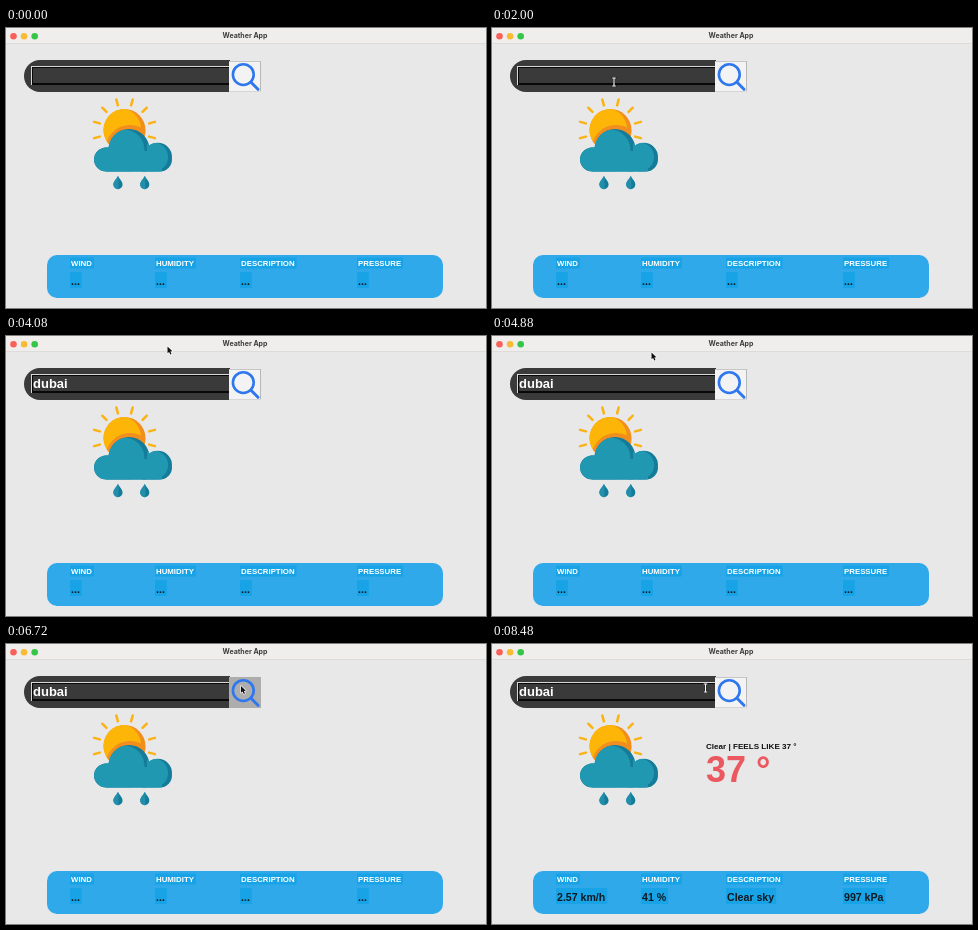
Animation, 480 px wide and 280 px high, one loop 8560 ms. Source, as an HTML page with a canvas:

```html
<!DOCTYPE html>
<html lang="en">
<head>
<meta charset="utf-8">
<title>Weather App</title>
<style>
html, body { margin: 0; width: 100%; height: 100%; overflow: hidden; background: #e8e8e8; }
canvas { display: block; width: 480px; height: 280px; }
</style>
</head>
<body>
<canvas id="stage"></canvas>
<script>
const LOOP = 8560, STEP = 80;
const TYPING_START = 2400, KEY_INTERVAL = 160;
const PRESS = 6640, RELEASE = 6880, RESULT = 7360;
const SANS = '"Liberation Sans", Arial, sans-serif';

const canvas = document.getElementById('stage');
const ctx = canvas.getContext('2d');
const ratio = window.devicePixelRatio || 1;
canvas.width = 480 * ratio;
canvas.height = 280 * ratio;

// Pointer stops: time, x, y
const path = [
  [480, 176, 104], [1280, 122, 54], [2080, 122, 54], [2640, 119, -7],
  [3280, 119, -7], [3760, 150, 5], [4080, 161.5, 10.5], [4480, 159.5, 16.5],
  [5920, 159.5, 16.5], [6480, 235, 42], [7520, 235, 42], [8240, 213.5, 44]
];

const columns = [
  { x: 65, label: 'WIND', value: '2.57 km/h' },
  { x: 150, label: 'HUMIDITY', value: '41 %' },
  { x: 235, label: 'DESCRIPTION', value: 'Clear sky' },
  { x: 352, label: 'PRESSURE', value: '997 kPa' }
];

function rect(x, y, w, h, color) {
  ctx.fillStyle = color;
  ctx.fillRect(x, y, w, h);
}

function circle(x, y, r, color) {
  ctx.beginPath();
  ctx.arc(x, y, r, 0, Math.PI * 2);
  ctx.fillStyle = color;
  ctx.fill();
}

function rounded(x, y, w, h, r, color) {
  ctx.beginPath();
  ctx.roundRect(x, y, w, h, r);
  ctx.fillStyle = color;
  ctx.fill();
}

function line(x1, y1, x2, y2, width, color, cap = 'round') {
  ctx.beginPath();
  ctx.moveTo(x1, y1);
  ctx.lineTo(x2, y2);
  ctx.lineWidth = width;
  ctx.lineCap = cap;
  ctx.strokeStyle = color;
  ctx.stroke();
}

function text(str, x, y, size, color, family = SANS, align = 'left') {
  ctx.font = `bold ${size}px ${family}`;
  ctx.textAlign = align;
  ctx.fillStyle = color;
  ctx.fillText(str, x, y);
}

function clipped(trace, draw) {
  ctx.save();
  ctx.beginPath();
  trace();
  ctx.clip();
  draw();
  ctx.restore();
}

function drawWindow() {
  rect(0, 0, 480, 280, '#e8e8e8');
  rect(0, 0, 480, 16, '#f0eeed');
  rect(0, 15, 480, 1, '#dedcdb');
  ['#f9605a', '#f8bb35', '#35c648'].forEach((color, i) => circle(7.5 + i * 10.6, 8.3, 3.3, color));
  text('Weather App', 239, 10, 7, '#3d3b3b', 'Inter, sans-serif', 'center');
}

function drawSearch(typed, pressed) {
  rounded(18, 32, 206, 32, [16, 0, 0, 16], '#3a3a3a');
  ctx.lineWidth = 1;
  ctx.strokeStyle = '#d8d8d8';
  ctx.strokeRect(25.5, 38.5, 200, 18);
  ctx.strokeStyle = '#080808';
  ctx.strokeRect(26.5, 39.5, 200, 16);
  rect(26, 56, 198, 1, '#080808');
  text(typed, 27, 52, 13, '#fff');

  rect(223, 33, 32, 31, pressed ? '#adadad' : '#f3f3f3');
  if (!pressed) {
    rect(223, 33, 32, 1, '#c6c6c6');
    rect(254, 33, 1, 31, '#b8b8b8');
    rect(223, 63, 32, 1, '#d6d6d6');
  }
  const blue = '#2f77ee';
  ctx.beginPath();
  ctx.arc(237.3, 46.6, 10.4, 0, Math.PI * 2);
  ctx.lineWidth = 2.6;
  ctx.strokeStyle = blue;
  ctx.stroke();
  line(245, 54.3, 252, 61.3, 3, blue);
}

function traceCloud() {
  ctx.roundRect(88, 119.5, 78, 24, 12);
  ctx.moveTo(143.5, 121.5);
  ctx.arc(123, 121.5, 20.5, 0, Math.PI * 2);
  ctx.moveTo(166, 129);
  ctx.arc(151.8, 129, 14.2, 0, Math.PI * 2);
}

function traceDrop(x) {
  ctx.moveTo(x, 148);
  ctx.bezierCurveTo(x + 1.5, 151, x + 4.6, 153.5, x + 4.6, 156.6);
  ctx.arc(x, 156.6, 4.6, 0, Math.PI);
  ctx.bezierCurveTo(x - 4.6, 153.5, x - 1.5, 151, x, 148);
}

function drawIcon() {
  const sunX = 118.5, sunY = 102;
  for (let deg = -105; deg <= 105; deg += 30) {
    const a = deg * Math.PI / 180, dx = Math.sin(a), dy = -Math.cos(a);
    line(sunX + dx * 25.5, sunY + dy * 25.5, sunX + dx * 31.5, sunY + dy * 31.5, 2.5, '#fbb314');
  }
  clipped(() => ctx.arc(sunX, sunY, 21, 0, Math.PI * 2), () => {
    rect(90, 75, 60, 60, '#f28e1e');
    circle(sunX - 4.5, sunY - 1, 21, '#fdb507');
    circle(124, 121.5, 24.5, '#f28e1e');
  });
  clipped(traceCloud, () => {
    rect(85, 98, 85, 48, '#147b99');
    circle(147.5, 129, 14.6, '#2198b2');
    clipped(() => ctx.rect(85, 98, 56, 48), () => {
      rect(134, 113, 8, 10, '#147b99');
      rounded(88, 119.5, 48, 24, 12, '#2198b2');
      circle(118, 122, 20.5, '#2198b2');
      rect(100, 125, 50, 19, '#2198b2');
    });
    rect(136, 130, 20, 14, '#2198b2');
  });
  for (const x of [112, 138.8]) {
    clipped(() => traceDrop(x), () => {
      rect(x - 5, 147, 10, 15, '#147b99');
      rect(x - 5, 147, 5.5, 15, '#218fac');
    });
  }
}

function drawPanel(loaded) {
  rounded(41, 227, 396, 43, 10, '#30a9eb');
  for (const { x, label, value } of columns) {
    const shown = loaded ? value : '...';
    ctx.font = `bold 7.85px ${SANS}`;
    rect(x - 1, 229.5, ctx.measureText(label).width + 3, 11, '#17a3e6');
    ctx.font = `bold 10.6px ${SANS}`;
    rect(x - 1, 244, ctx.measureText(shown).width + 3, 16, '#17a3e6');
    text(label, x, 238, 7.85, '#fff');
    text(shown, x, 256.5, 10.6, '#101820');
  }
}

function drawResult() {
  text('Clear | FEELS LIKE 37 °', 214, 105, 8.1, '#111');
  text('37 °', 214, 138, 36, '#ec5860');
}

function pointerAt(t) {
  const next = path.findIndex(stop => stop[0] > t);
  if (next < 0) return path[path.length - 1].slice(1);
  const [t0, x0, y0] = path[next - 1], [t1, x1, y1] = path[next];
  const u = (t - t0) / (t1 - t0), k = u * u * (3 - 2 * u);
  return [x0 + (x1 - x0) * k, y0 + (y1 - y0) * k];
}

function drawBeam(x, y) {
  for (const [width, color] of [[2.2, '#111'], [1.1, '#fff']]) {
    line(x, y - 3.5, x, y + 3.5, width, color);
    line(x - 1.4, y - 4, x + 1.4, y - 4, width, color);
    line(x - 1.4, y + 4, x + 1.4, y + 4, width, color);
  }
}

function drawArrow(x, y) {
  ctx.save();
  ctx.translate(x, y);
  ctx.beginPath();
  ctx.moveTo(0, 0);
  for (const [px, py] of [[0, 6.8], [1.6, 5.4], [2.8, 8], [4, 7.4], [2.9, 5], [4.9, 4.8]]) ctx.lineTo(px, py);
  ctx.closePath();
  ctx.lineJoin = 'round';
  ctx.lineWidth = 1.2;
  ctx.strokeStyle = '#fff';
  ctx.stroke();
  ctx.fillStyle = '#111';
  ctx.fill();
  ctx.restore();
}

function drawPointer(t) {
  if (t < path[0][0]) return;
  const [x, y] = pointerAt(t);
  const overField = x > 25 && x < 223 && y > 37 && y < 58;
  (overField ? drawBeam : drawArrow)(x, y);
}

function render(now) {
  const t = Math.floor((now % LOOP) / STEP) * STEP;
  const letters = Math.max(0, Math.floor((t - TYPING_START) / KEY_INTERVAL) + 1);
  const loaded = t >= RESULT;
  ctx.setTransform(ratio, 0, 0, ratio, 0, 0);
  drawWindow();
  drawSearch('dubai'.slice(0, letters), t >= PRESS && t < RELEASE);
  drawIcon();
  drawPanel(loaded);
  if (loaded) drawResult();
  drawPointer(t);
}

const start = performance.now();
function tick() {
  render(performance.now() - start);
  requestAnimationFrame(tick);
}
tick();
</script>
</body>
</html>
```
